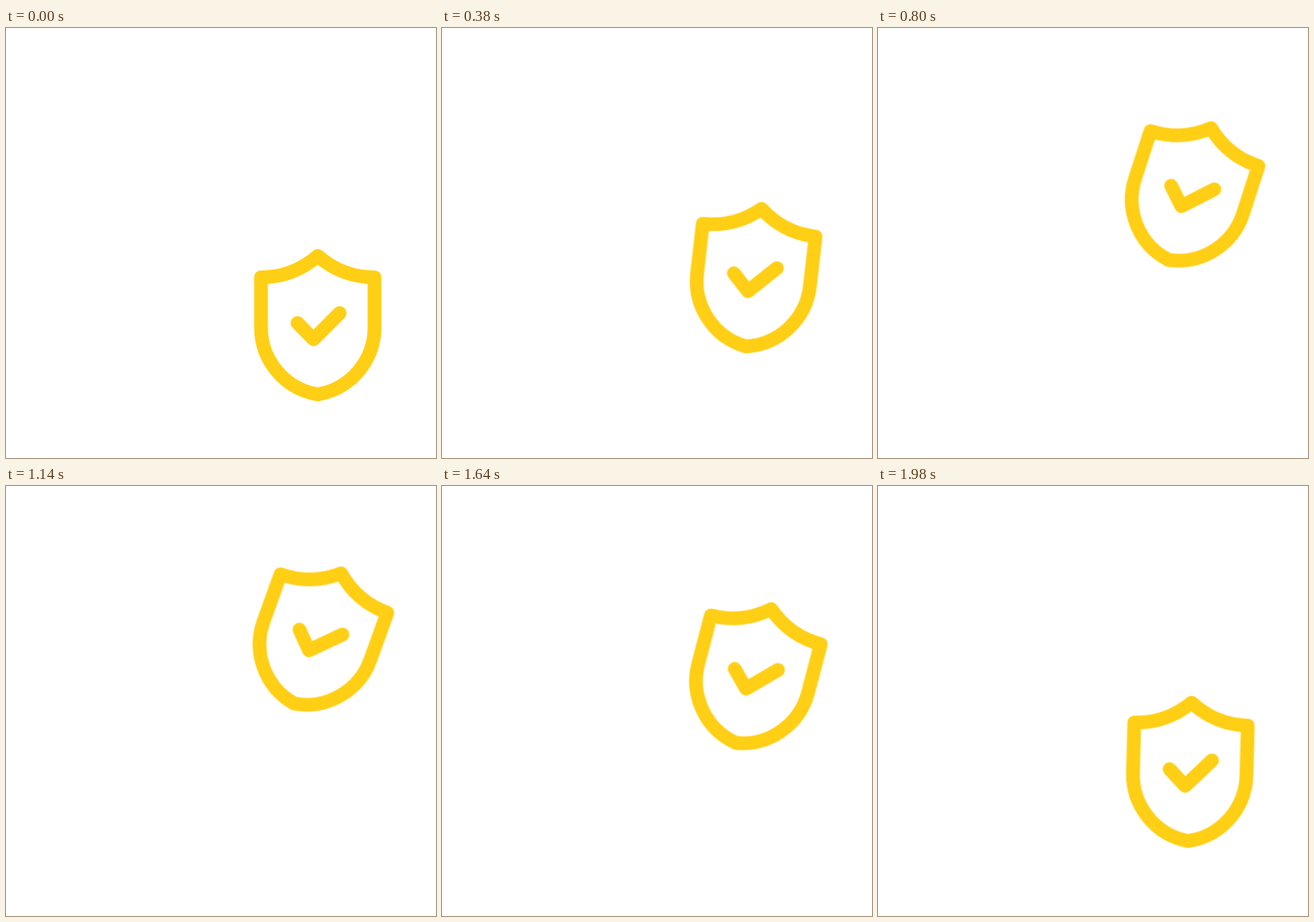
Write an HTML page that moves like this. It is 500 px wide and 500 px high and loops after 2000 ms.

```html
<!DOCTYPE html>
<html lang="en">
<head>
<meta charset="utf-8">
<title>Shield</title>
<style>
  html, body {
    margin: 0;
    width: 100%;
    height: 100%;
    overflow: hidden;
    background: #fff;
  }
  svg {
    display: block;
    width: 100%;
    height: 100%;
  }
  .shield {
    fill: none;
    stroke: #ffcf15;
    stroke-width: 16;
    stroke-linecap: round;
    stroke-linejoin: round;
    transform-origin: 362.5px 345.5px;
    animation: toss 2s infinite;
  }
  /* Gentle rise with a tilt, then an accelerating fall */
  @keyframes toss {
    0% {
      transform: translateY(0) rotate(0deg);
      animation-timing-function: cubic-bezier(.333, 0, .667, 1);
    }
    50% {
      transform: translateY(-170px) rotate(20deg);
      animation-timing-function: cubic-bezier(.333, 0, .81, .17);
    }
    100% {
      transform: translateY(0) rotate(0deg);
    }
  }
</style>
</head>
<body>
<svg viewBox="0 0 500 500">
  <g class="shield">
    <path d="M362.5 265 A101 101 0 0 0 428.5 290 V348 A79 79 0 0 1 362.5 426 A79 79 0 0 1 296.5 348 V290 A101 101 0 0 0 362.5 265 Z"/>
    <path d="M339 343 L357.5 362 L388 331.5"/>
  </g>
</svg>
</body>
</html>
```
